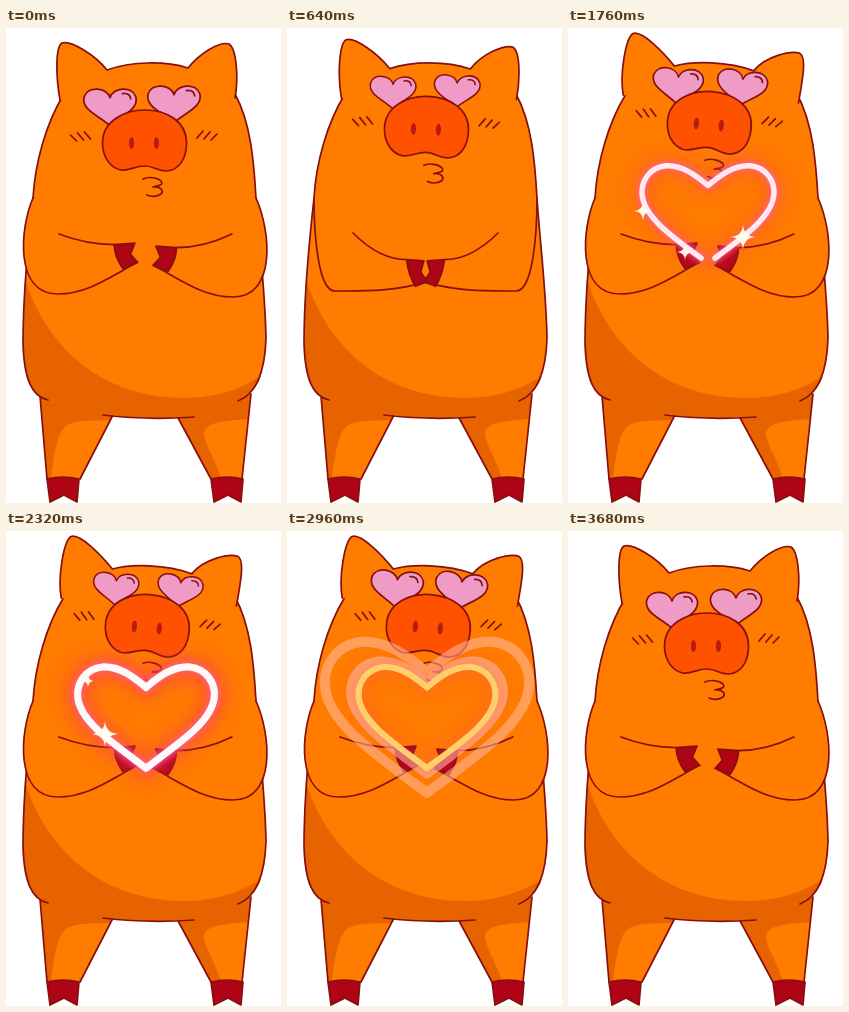
An HTML page that plays this animation: 275x475 px, repeating every 3760 ms.

```html
<!DOCTYPE html>
<html lang="en">
<head>
<meta charset="utf-8">
<title>Pig drawing a neon heart</title>
<style>
html, body { margin: 0; width: 100%; height: 100%; overflow: hidden; background: #fff; }
svg { display: block; width: 275px; height: 475px; }
.line { fill: none; stroke: #85100f; stroke-width: 1.7; stroke-linecap: round; stroke-linejoin: round; }
.skin { fill: #ff7c00; }
.shade { fill: #e66300; }
.hoof { fill: #ae0416; }
.pink { fill: #f09bc6; }
.snout { fill: #ff5200; }
.neon { fill: none; stroke-linecap: round; stroke-linejoin: round; }
</style>
</head>
<body>
<svg viewBox="0 0 275 475">
  <defs>
    <filter id="soft" x="-40%" y="-60%" width="180%" height="220%"><feGaussianBlur stdDeviation="9"/></filter>
    <filter id="near" x="-40%" y="-60%" width="180%" height="220%"><feGaussianBlur stdDeviation="2.6"/></filter>
    <path id="eye" class="line pink" d="M0-8C3-18 21-20 25-9C28 4 11 9 0 19C-11 9-28 4-25-9C-21-20-3-18 0-8ZM12-12q7-1 8 5"/>
    <path id="marks" class="line" d="M-10-2l6 6M-3-4l6 7M4-5l6 7"/>
    <path id="foot" class="line hoof" d="M0 1Q16-3 32 1L30 24L17 17L3 24Z"/>
  </defs>

  <path class="skin" d="M34 368L41 451H74L107 387ZM171 388L205 451H236L245 366Z"/>
  <path class="shade" d="M34 368L41 451H45C48 426 51 405 60 398C70 391 90 393 104 392L110 380ZM171 388L205 451H215C209 430 198 416 198 405C200 393 222 393 242 391L245 366Z"/>
  <path class="line" d="M34 368L41 451M107 387L74 451M171 388L205 451M245 366L236 451"/>
  <use href="#foot" x="41" y="450"/>
  <use href="#foot" x="205" y="450"/>

  <path class="skin" d="M58 66C40 95 29 135 27 170C22 215 17 265 17 315C18 350 25 368 42 373L105 387C130 391 160 391 188 388L232 373C250 366 259 345 260 310C259 260 253 215 250 170C248 135 245 95 229 66Z"/>
  <path class="shade" d="M19 250C34 304 84 370 178 370C205 370 230 364 255 348C250 362 242 369 232 373L188 388C160 391 130 391 105 387L42 373C25 368 18 350 17 315C17 290 18 270 19 250Z"/>
  <path class="line" d="M58 66C40 95 29 135 27 170C22 215 17 265 17 315C18 350 25 368 42 372M97 387C130 391 160 391 188 389M232 373C250 366 259 345 260 310C259 260 253 215 250 170C248 135 245 95 229 66"/>
  <path id="head" class="line skin"/>

  <g id="face">
    <g id="eyeL"><use href="#eye"/></g>
    <g id="eyeR"><use href="#eye"/></g>
    <use href="#marks" transform="translate(74.5 109)"/>
    <use href="#marks" transform="translate(201 108) scale(-1 1)"/>
    <g transform="translate(138.5 113)">
      <path class="line snout" d="M-42 2C-42-20-20-31 0-31C22-31 42-20 42 2C42 16 36 29 22 30C12 30 10 25 0 25C-10 25-14 30-24 29C-36 26-42 14-42 2Z"/>
      <ellipse cx="-13" cy="2" rx="2.6" ry="6" fill="#b81c10"/>
      <ellipse cx="12" cy="2" rx="2.6" ry="6" fill="#b81c10"/>
    </g>
    <path class="line" transform="translate(148 159)" d="M-11-8C-5-11 4-9 7-6C10-2 4-1-1 0C7-1 10 4 7 7C3 10-3 10-7 8"/>
  </g>

  <g id="arms"></g>
  <g id="waves"></g>
  <g id="heart"></g>
  <g id="sparks"></g>
</svg>

<script>
const LOOP = 3760, STEP = 80;
const $ = id => document.getElementById(id);
function set(el, attrs) {
  for (const k in attrs) el.setAttribute(k, attrs[k]);
}
function make(tag, parent, attrs = {}) {
  const el = document.createElementNS('http://www.w3.org/2000/svg', tag);
  set(el, attrs);
  return parent.appendChild(el);
}
const ramp = (t, a, b) => Math.max(0, Math.min(1, (t - a) / (b - a)));
const ease = x => (1 - Math.cos(Math.PI * x)) / 2;
const mix = (a, b, k) => a + (b - a) * k;
const blend = (a, b, k) => a.map((v, i) => mix(v, b[i], k));
const show = on => on ? 'visible' : 'hidden';

// head: both ears and the brow line, tilted around the nose bridge
function headPath(tilt) {
  const turn = (x, y, w) => {
    const a = .113 * tilt * w;
    return [x + a * (95 - y), y + a * (x - 140)];
  };
  const off = ([x, y], dx, dy) => [x + dx, y + dy];
  const ear = (base, tip, inner, s) => [
    base, off(base, -4 * s, -22), off(tip, -7 * s, 4), tip,
    off(tip, 9 * s, -3), off(inner, -12 * s, -15), inner
  ];
  const left = ear(turn(54, 72, .5), turn(56, 15, 1), turn(101, 42, .9), 1);
  const right = ear(turn(229, 70, .5), turn(223, 16, 1), turn(182, 40, .6), -1);
  const [start, ...rest] = [...left, [125, 33], [160, 33], ...right.reverse()];
  return `M${start}C${rest.join(' ')}`;
}

function drawHead(t) {
  const u = ease(ramp(t, 40, 1200)) - ease(ramp(t, 3000, 3680));
  const tilt = Math.pow(u, 1.7), rise = Math.sin(u * Math.PI / 2);
  set($('head'), { d: headPath(tilt) });
  set($('face'), { transform: `translate(${3 * tilt} ${-18.5 * rise}) rotate(${4.5 * tilt} 138.5 113)` });
  const beat = .96 + .08 * Math.cos(2 * Math.PI * (4 * t / LOOP - .06));
  set($('eyeL'), { transform: `translate(104 78) scale(${beat})` });
  set($('eyeR'), { transform: `translate(168 75) rotate(${3 * tilt}) scale(${beat})` });
}

// bulge, elbow xy, forearm xy, inner xy, hand xy, hand angle, length, width, drop of the right side
const rest = [44, 52, 266, 105, 248, 53, 206, 112.5, 228.5, -20, 1, 1, 3];
const fold = [18, 48, 263, 105, 264, 66, 205, 124, 245, -18, .8, 1.1, 0];
const lift = [32, 58, 244, 104, 205, 49, 203, 71, 165, -30, 1.5, .55, 8];
const meet = lift.map((v, i) => v + ({ 3: 20, 7: 36, 8: 4 }[i] || 0));
const armTrack = [[0, rest], [560, fold], [720, fold], [1140, meet], [1280, lift], [1760, rest], [LOOP, rest]];
const hoof = [[0, -12.7], [20, -7], [12, 2], [16, 12], [0, 12.7], [-4, 0]];

function armPaths(pose, isRight) {
  const [bulge, ex, ey, fx, fy, ix, iy, hx, hy, angle, len, wide, drop] = pose;
  const at = (x, y, d = drop) => isRight ? [277 - x + d * .6, y + d] : [x, y];
  const a = angle * Math.PI / 180, c = Math.cos(a), s = Math.sin(a);
  const spot = ([x, y]) => [hx + x * len * c - y * wide * s, hy + x * len * s + y * wide * c];
  const pts = hoof.map(spot), [top, , , low] = pts;
  const [p0, p1, p2, p3, p4, back] = pts.map(p => at(...p));
  const inner = isRight ? [277 - ix + drop * .6, iy] : [ix, iy];
  const outer = `M${at(27, 170, 0)}C${at(27 - (bulge - 18) / 2, 200)} ${at(ex - bulge, ey)} ${at(ex, ey)}` +
    `C${at(ex + 30, ey)} ${at(fx, fy)} ${at(...low)}`;
  const under = `${p0}Q${at((top[0] + ix) / 2, top[1])} ${inner}`;
  return {
    fill: `${outer}L${under}Z`,
    edge: `${outer}M${under}`,
    hoof: `M${p0}L${p1}L${p2}L${p3}L${p4}Q${back} ${p0}Z`
  };
}
const arms = [false, true].map(isRight => ({
  isRight,
  fill: make('path', $('arms'), { class: 'skin' }),
  edge: make('path', $('arms'), { class: 'line' }),
  hoof: make('path', $('arms'), { class: 'line hoof' })
}));

function drawArms(t) {
  const i = armTrack.findIndex((k, n) => t < armTrack[n + 1][0]);
  const [t0, a] = armTrack[i], [t1, b] = armTrack[i + 1];
  const lin = ramp(t, t0, t1);
  const pose = blend(a, b, t < 1140 ? ease(lin) : lin);
  for (const arm of arms) {
    const d = armPaths(pose, arm.isRight);
    for (const part in d) set(arm[part], { d: d[part] });
  }
}

const halfHeart = 'M0-30C-11-39-25-51-43-50C-59-48-68-35-67-21C-65 3-35 23 0 49';
const strands = (parent, attrs) => [1, -1].map(dir =>
  make('path', parent, { class: 'neon', d: halfHeart, pathLength: 1, transform: `scale(${dir} 1)`, ...attrs }));
const layers = [
  { color: '#ff3058', width: 16, filter: 'url(#soft)' },
  { color: '#ff5f9c', width: 4, filter: 'url(#near)' },
  { width: 0 }
].map(l => {
  const g = make('g', $('heart'), l.filter ? { filter: l.filter } : {});
  return { ...l, g, paths: strands(g) };
});
const waves = [2800, 2930].map(start => {
  const g = make('g', $('waves'));
  strands(g, { stroke: '#ffbfa8' });
  return { start, g };
});

function drawHeart(t) {
  const drawn = ramp(t, 1133, 1790);
  const full = ease(ramp(t, 1760, 2080));
  const gold = ramp(t, 2780, 2940);
  const fade = 1 - ramp(t, 2960, 3280);
  set($('heart'), {
    visibility: show(drawn > 0 && fade > 0),
    opacity: fade,
    transform: `translate(140 187) scale(${mix(.985, 1.02, full)})`
  });
  const core = mix(mix(5.5, 7, full), 6, gold);
  const tint = `rgb(255,${mix(mix(232, 250, full), 207, gold)},${mix(mix(242, 250, full), 108, gold)})`;
  const glow = [mix(.28, .5, full) * (1 - .7 * gold), .7 * (1 - .85 * gold), 1];
  layers.forEach((l, i) => {
    set(l.g, { opacity: glow[i] });
    for (const el of l.paths) set(el, {
      stroke: l.color || tint,
      'stroke-width': core + l.width,
      'stroke-dasharray': drawn < 1 ? `${drawn} 2` : 'none'
    });
  });
  for (const w of waves) {
    const age = t - w.start, s = 1.04 + age / 330;
    set(w.g, {
      visibility: show(age > 0 && age < 480),
      opacity: .6 * (1 - ramp(age, 120, 480)),
      transform: `translate(140 187) scale(${s})`,
      'stroke-width': 10 / s
    });
  }
}

// x, y, size, time of full size
const sparks = [
  [179, 135, 10, 1280], [122, 151, 8, 1280], [201, 187, 8, 1280],
  [75, 183, 9, 1760], [175, 209, 12, 1760], [117, 224, 8, 1760],
  [99, 203, 13, 2320], [82, 150, 6, 2320]
].map(([x, y, r, at]) => {
  const g = make('g', $('sparks'));
  make('path', g, { d: 'M0-1Q.07-.07 1 0Q.07.07 0 1Q-.07.07-1 0Q-.07-.07 0-1Z', fill: '#fffbe8' });
  make('circle', g, { r: .2, fill: '#fff' });
  return { x, y, r, at, g };
});

function drawSparks(t) {
  for (const s of sparks) {
    const k = 1 - Math.abs(t - s.at) / 320;
    set(s.g, {
      visibility: show(k > 0),
      transform: `translate(${s.x} ${s.y}) scale(${Math.max(k, 0) * s.r})`
    });
  }
}

function draw(t) {
  drawHead(t);
  drawArms(t);
  drawHeart(t);
  drawSparks(t);
}

let begin;
function tick(now) {
  if (begin === undefined) begin = now;
  draw(Math.floor((now - begin) % LOOP / STEP) * STEP);
  requestAnimationFrame(tick);
}
draw(0);
requestAnimationFrame(tick);
</script>
</body>
</html>
```
